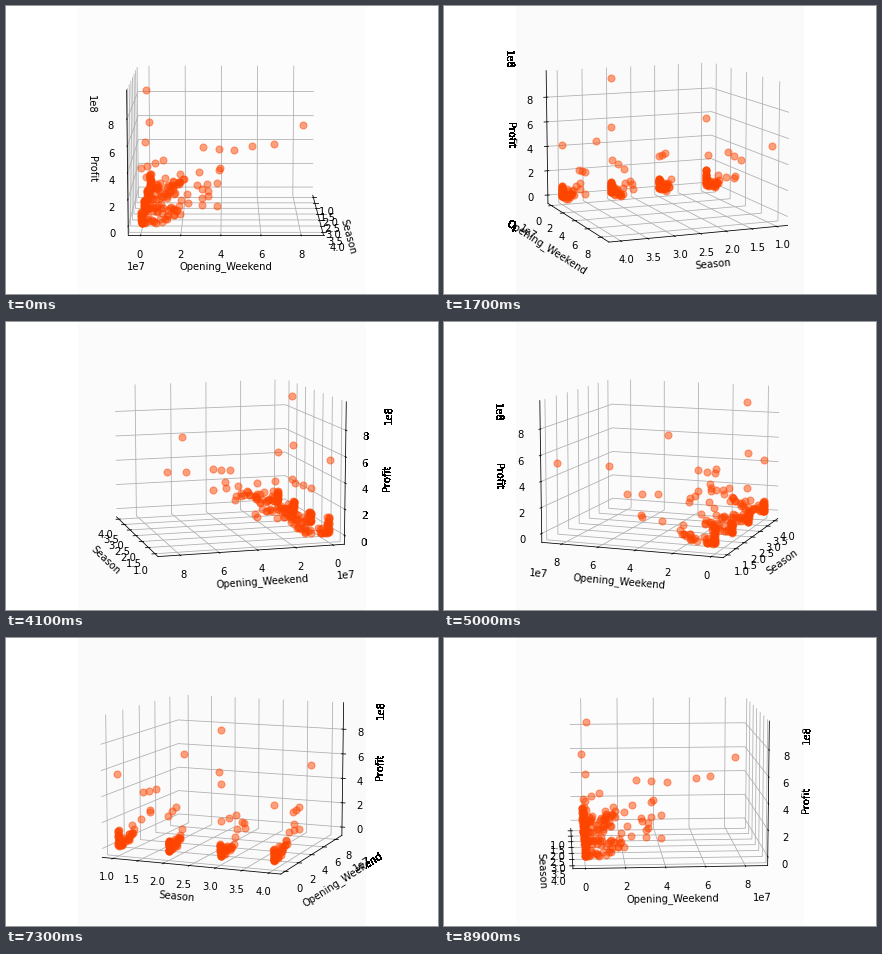
These frames come from a looping animation (432x288 px, 9000 ms). A matplotlib script:

```python
import matplotlib.pyplot as plt
import numpy as np
from matplotlib.animation import FuncAnimation
from mpl_toolkits.mplot3d import Axes3D

FRAMES = 90
ELEV = 10
PAD = 7 / 96  # margin around the data, as a share of its span

# season, opening weekend (1e7), profit (1e8)
HITS = [(1, 8.5, 5.33), (1, 0, 5.65), (2, 6.8, 4.5), (3, 0.15, 9.45),
        (3, 0.07, 5.45), (4, 5.55, 5.84), (4, 0, 4.2)]
# per season: first and last of three evenly spaced good sellers
STREAKS = {1: ((3, 3.5), (4.7, 3.28)), 2: ((0, 2.73), (0.9, 3.2)),
           3: ((0.1, 2.68), (2.1, 2.52)), 4: ((2.8, 2.88), (3.8, 3.03))}


def harden(img, dpi):
    """Drop partial transparency, so text off the axes patch has hard edges."""
    img = img.copy()
    img[..., 3] = img[..., 3] > 0.12
    return img, 0, 0


class HardAxes(Axes3D):
    def draw(self, renderer):
        renderer.start_filter()
        super().draw(renderer)
        renderer.stop_filter(harden)


def season_films(rng, season, n=22):
    """A streak, some middling films, and a crowd of small openings."""
    streak = np.linspace(*STREAKS[season], 3)
    mid = 0 if season == 2 else 4
    middling = np.c_[rng.uniform(1.5, 4, mid), rng.uniform(1.1, 2, mid)]
    top = 1.35 if season == 1 else 0.9
    column = np.c_[np.abs(rng.normal(0, 0.05, n)), top * rng.random(n) ** 1.3]
    opening = 2 * rng.beta(1.2, 1.6, n)
    profit = np.abs(0.35 * opening + rng.normal(0, 0.25, n))
    films = np.vstack([streak, middling, column, np.c_[opening, profit]])
    return np.c_[np.full(len(films), season), films]


def padded(low, high):
    margin = PAD * (high - low)
    return low - margin, high + margin


rng = np.random.default_rng(4)
data = np.vstack([HITS] + [season_films(rng, s) for s in STREAKS])
season, opening, profit = (data * (1, 1e7, 1e8)).T

fig = plt.figure(figsize=(6, 4), dpi=72, facecolor="white")
ax = fig.add_axes([0, 0, 1, 1], axes_class=HardAxes)
ax.scatter(season, opening, profit, s=50, c="orangered", alpha=0.5,
           depthshade=False)

ax.set(xlim=padded(1, 4), ylim=padded(0, 8.5e7), zlim=padded(0, 9.45e8),
       xlabel="Season", ylabel="Opening_Weekend", zlabel="Profit")
ax.set_xticks(np.arange(1, 4.5, 0.5))
ax.set_yticks(np.arange(0, 10, 2) * 1e7)
ax.set_zticks(np.arange(0, 10, 2) * 1e8)
for axis in (ax.xaxis, ax.yaxis, ax.zaxis):
    axis.pane.set_visible(False)


def update(i):
    azim = 360 * i / FRAMES
    ax.view_init(elev=ELEV, azim=azim)
    gray = (252 - 2 * abs(np.sin(np.radians(azim)))) / 255
    ax.set_facecolor((gray, gray, gray))


anim = FuncAnimation(fig, update, frames=FRAMES, interval=100, repeat=True,
                     init_func=lambda: update(0))
plt.show()
```
